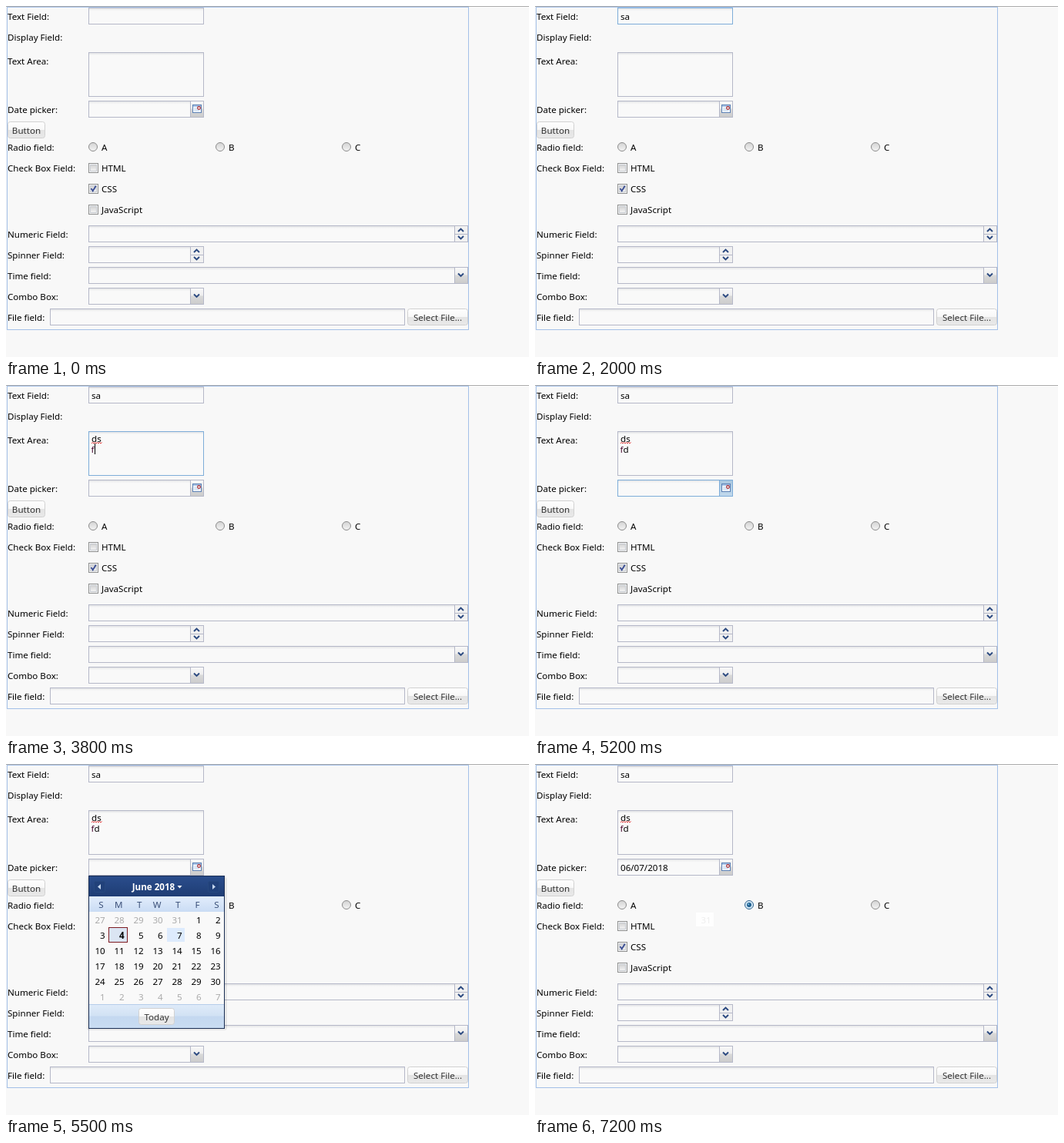
An HTML page that plays this animation: 679x456 px, repeating every 8000 ms.

```html
<!DOCTYPE html>
<html lang="en">
<head>
<meta charset="utf-8">
<title>Form fields</title>
<style>
html, body { margin: 0; width: 100%; height: 100%; overflow: hidden; background: #f8f8f8; }
svg { display: block; width: 679px; height: 456px; }
text { font: 11.6px "Noto Sans", "Open Sans", sans-serif; fill: #000; }
.bold { font-weight: 700; }
.mid { text-anchor: middle; }
.end { text-anchor: end; }
</style>
</head>
<body>
<svg viewBox="0 0 679 456">
  <defs id="defs"></defs>
  <g id="scene"></g>
</svg>
<script>
const LOOP = 8000;
const LINE = '#b5b8c8', FOCUS = '#7eadd9', NAVY = '#2c4a80';

const gradient = (id, ...stops) =>
  `<linearGradient id="${id}" x2="0" y2="1">${stops.map(([at, color]) =>
    `<stop offset="${at}" stop-color="${color}"/>`).join('')}</linearGradient>`;

document.getElementById('defs').innerHTML =
  gradient('button', [0, '#fefefe'], [.48, '#f8f8f8'], [.52, '#e4e4e4'], [1, '#e9e9e9']) +
  gradient('trigger', [0, '#f8f8f8'], [.45, '#eeeeee'], [.5, '#d9d9d9'], [1, '#cccccc']) +
  gradient('triggerFocus', [0, '#eaf3fc'], [.45, '#d6e6f6'], [.5, '#bdd5ee'], [1, '#b3cde8']) +
  gradient('triggerOver', [0, '#e4f1fb'], [.5, '#cce2f4'], [1, '#bfdaf0']) +
  gradient('triggerDown', [0, '#a9c7df'], [.5, '#b5d0e6'], [1, '#c0d8ec']) +
  gradient('inset', [0, '#e3e4e6'], [1, '#f8f8f8']) +
  gradient('box', [0, '#d3d3d3'], [1, '#f4f4f4']) +
  gradient('header', [0, '#2a4d8c'], [1, '#1f3d74']) +
  gradient('weekdays', [0, '#e2edfc'], [1, '#cadcf4']) +
  gradient('footer', [0, '#dfebf9'], [.48, '#d2e2f4'], [.52, '#c4d8f0'], [1, '#c9dcf2']);

const fill = (x, y, w, h, color, extra = '') =>
  `<rect x="${x}" y="${y}" width="${w}" height="${h}" fill="${color}" ${extra}/>`;
const frame = (x, y, w, h, stroke, color = 'none', r = 0) =>
  fill(x + .5, y + .5, w - 1, h - 1, color, `stroke="${stroke}" rx="${r}"`);
const label = (x, y, str, cls = '', color = '#000') =>
  `<text x="${x}" y="${y}" class="${cls}" style="fill:${color}">${str}</text>`;
const path = (d, stroke, width = 1) =>
  `<path d="${d}" fill="none" stroke="${stroke}" stroke-width="${width}"/>`;
const shape = (d, color) => `<path d="${d}" fill="${color}"/>`;
const caret = (x, y) => fill(x, y, 1, 14, '#000');

const input = (x, y, w, h = 22, focused = false) =>
  fill(x, y, w, h, '#f9f9f9') + fill(x + 1, y + 1, w - 2, 3, 'url(#inset)') +
  frame(x, y, w, h, focused ? FOCUS : LINE);

const chevron = (x, y, up) => {
  const d = up ? -2 : 2;
  return path(`M${x - 3.5} ${y - d}L${x} ${y + d * .7}L${x + 3.5} ${y - d}`, NAVY, 2);
};

function withTrigger(x, y, w, { paint = 'trigger', focused = false } = {}) {
  const left = x + w - 18;
  return input(x, y, w, 22, focused) +
    fill(left + 1, y + 1, 16, 20, `url(#${paint})`) +
    fill(left, y + 1, 1, 20, focused ? FOCUS : LINE);
}

function combo(y, w) {
  return withTrigger(107, y, w) + chevron(107 + w - 9.5, y + 10.5);
}

function spinner(y, w) {
  const cx = 107 + w - 9.5;
  return withTrigger(107, y, w) + fill(107 + w - 17, y + 1, 16, 20, '#f1f1f1') +
    fill(107 + w - 17, y + 11, 16, 1, LINE) +
    chevron(cx, y + 6, true) + chevron(cx, y + 16);
}

const button = (x, y, w, str) =>
  frame(x, y, w, 22, '#d1d1d1', 'url(#button)', 3) + label(x + w / 2, y + 16, str, 'mid', '#333');

function radio(x, str, on) {
  const ring = on ? '#2f628c' : '#8c8c8c';
  return `<circle cx="${x}" cy="183" r="5.5" fill="${on ? '#d3e8f6' : 'url(#box)'}" stroke="${ring}"/>` +
    (on ? `<circle cx="${x}" cy="183" r="3" fill="#1f5f8e"/><circle cx="${x - .8}" cy="182.2" r="1" fill="#7cc0e6"/>` : '') +
    label(x + 11, 188, str);
}

const checkbox = (y, str, on) =>
  frame(107, y, 13, 13, '#8e8f8f', '#f4f4f4') + frame(109, y + 2, 9, 9, '#c6cad0', 'url(#box)') +
  (on ? path(`M110.5 ${y + 6}L112.7 ${y + 9.3}L116.7 ${y + 2.8}`, '#3c4f95', 1.9) : '') +
  label(124, y + 11, str);

const dateIcon =
  frame(242, 128, 12, 11, '#5b80b4', '#f4f8fd') + fill(243, 129, 10, 2, '#a9c4e6') +
  fill(244, 132, 7, 5, '#dbe7f5') +
  '<circle cx="250.5" cy="132.5" r="1.8" fill="#fff" stroke="#a5252b" stroke-width="1.2"/>';

const squiggle = path('M111 76l1.5 -1.5' + 'l1.5 1.5l1.5 -1.5'.repeat(4), '#e03030', 1);

const staticParts =
  fill(0, 0, 679, 1, '#acacac') + frame(1, 1, 600, 420, '#a3c0e8') +
  [['Text Field:', 18], ['Display Field:', 45], ['Text Area:', 76], ['Date picker:', 139],
   ['Radio field:', 188], ['Check Box Field:', 215], ['Numeric Field:', 301],
   ['Spinner Field:', 328], ['Time field:', 355], ['Combo Box:', 382], ['File field:', 409]]
    .map(([str, y]) => label(2, y, str)).join('') +
  button(2, 150, 49, 'Button') +
  checkbox(204, 'HTML') + checkbox(231, 'CSS', true) + checkbox(258, 'JavaScript') +
  spinner(285, 493) + spinner(312, 150) + combo(339, 493) + combo(366, 150) +
  input(57, 393, 461) + button(521, 393, 79, 'Select File...');

function calendar(hover) {
  let out = fill(105, 147, 182, 199, '#000', 'opacity=".07" rx="3"') +
    frame(107, 145, 177, 199, '#1b2f55', '#f9f9f9') +
    fill(108, 146, 175, 26, 'url(#header)') +
    frame(114, 152, 15, 15, '#27497f', '#21417a', 2) + frame(262, 152, 15, 15, '#27497f', '#21417a', 2) +
    shape('M123 156v7l-4 -3.5z', '#c5d6ee') + shape('M268 156v7l4 -3.5z', '#c5d6ee') +
    label(191.5, 164, 'June 2018', 'mid bold', '#fff') + shape('M222.5 158h6l-3 3.5z', '#fff') +
    fill(108, 172, 175, 20, 'url(#weekdays)');
  [...'SMTWTFS'].forEach((day, i) => out += label(126.5 + 25 * i, 187, day, 'end', '#3a4f78'));
  for (let i = 0; i < 42; i++) {
    const col = i % 7, row = Math.floor(i / 7), x = 108 + 25 * col, y = 192 + 20 * row;
    const june = i > 4 && i < 35, today = i === 8;
    const day = june ? i - 4 : i < 5 ? i + 27 : i - 34;
    if (i === hover) out += fill(x + 1, y + 1, 23, 18, '#ddebfd');
    if (today) out += frame(x, y, 25, 20, '#7d1c22', '#dbe5f3');
    out += label(x + 20.7, y + 15, day, today ? 'end bold' : 'end', june ? '#000' : '#aaa');
  }
  return out + fill(108, 312, 175, 31, 'url(#footer)') + fill(108, 312, 175, 1, '#b5cdea') +
    button(172, 317, 47, 'Today');
}

const within = (t, from, to) => t >= from && t < to;

// [from, to, x, y] of every visible caret phase
const carets = [
  [900, 1400, 111, 6], [1400, 1500, 116, 6], [1500, 2000, 123, 6],
  [2200, 2500, 111, 62], [2500, 2700, 118, 62], [2700, 3200, 123, 62],
  [3300, 3800, 111, 76], [3800, 3900, 115, 76], [3900, 4400, 121, 76],
  [4600, 5000, 111, 127], [5800, 6300, 173, 127]
];

function dateField(t) {
  const focused = within(t, 4600, 5300) || within(t, 5800, 6600);
  const paint = !focused ? 'trigger' : within(t, 5000, 5200) ? 'triggerOver' :
    within(t, 5200, 5300) ? 'triggerDown' : 'triggerFocus';
  return withTrigger(107, 123, 150, { paint, focused }) + dateIcon +
    (t >= 5800 ? label(111, 139, '06/07/2018') : '');
}

function scene(t) {
  const typed = (x, y, str, from, color) => t >= from ? label(x, y, str, '', color) : '';
  let out = staticParts +
    input(107, 2, 150, 22, within(t, 900, 2200)) +
    (t < 1500 ? typed(111, 18, 's', 1400) : label(111, 18, 'sa')) +
    input(107, 60, 150, 58, within(t, 2200, 4600)) +
    (t < 2700 ? typed(111, 74, 'd', 2500) : label(111, 74, 'ds')) +
    (t >= 3300 ? squiggle : '') +
    typed(110.5, 88, 'f', 3800, '#4a0a30') + typed(114.5, 88, 'd', 3900) +
    dateField(t) +
    radio(113, 'A', within(t, 6600, 7200)) + radio(278, 'B', t >= 7200) + radio(442, 'C', false);
  for (const [from, to, x, y] of carets) if (within(t, from, to)) out += caret(x, y);
  if (within(t, 5300, 5800)) out += calendar(t < 5400 ? -1 : t < 5500 ? 4 : 11);
  if (t >= 5800) out += fill(209, 193, 23, 18, '#fefefe') + label(228.7, 207, '31', 'end', '#eeeeee');
  return out;
}

const root = document.getElementById('scene');
const start = performance.now();
let shown = '';

function tick() {
  const next = scene((performance.now() - start) % LOOP);
  if (next !== shown) root.innerHTML = shown = next;
  requestAnimationFrame(tick);
}
tick();
</script>
</body>
</html>
```
